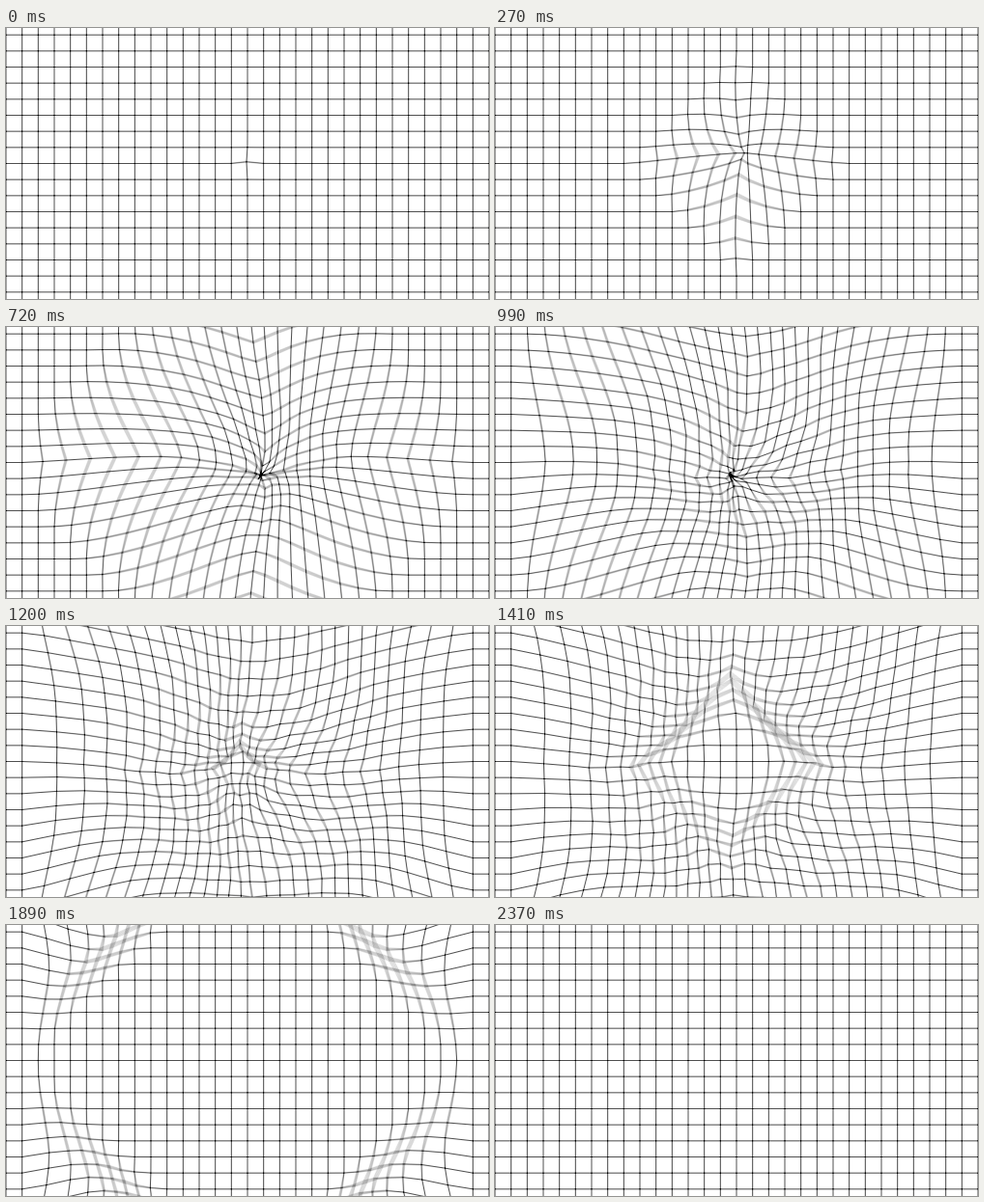
An HTML page with a canvas that plays this animation: 500 px wide and 281 px high, repeating every 2700 ms.

```html
<!DOCTYPE html>
<html lang="en">
<head>
<meta charset="utf-8">
<title>Grid ripple</title>
<style>
  html, body { margin: 0; width: 100%; height: 100%; overflow: hidden; background: #fff; }
  canvas { display: block; width: 100vw; height: 100vh; }
</style>
</head>
<body>
<canvas id="stage" width="500" height="281"></canvas>
<script>
const W = 500, H = 281, CX = 250, CY = 140.5;
const CELL = 500 / 30, COLS = 15, ROWS = 14;
const EDGE = 14 * CELL;           // points from here outwards stay still
const LOOP = 2700, STEP = 30;
const SPEED = 0.36;               // wave speed in px per ms
const LEAD = 30, SPAN = 1330;     // head start and length of one point's trip
const RISE = 450, FALL = 350;     // pull in, hold, let go
const PULL = 38, CORE = 36, SWAY = 20, SHIVER = 4;
const SAMPLES = 8, SHUTTER = 30;  // motion blur

const ctx = document.getElementById('stage').getContext('2d');
const clamp = v => Math.min(1, Math.max(0, v));
const ease = v => (1 - Math.cos(Math.PI * clamp(v))) / 2;

// A diamond-shaped wave pulls each point inwards while it sways round, then frees it.
function place(i, j, t) {
  const x = i * CELL, y = j * CELL;
  const age = t + LEAD - (Math.abs(x) + Math.abs(y)) / SPEED;
  if (Math.abs(i) >= 14 || age <= 0 || age >= SPAN) return [CX + x, CY + y];
  const p = age / SPAN;
  const reach = clamp(Math.pow(x ** 4 + y ** 4, 0.25) / EDGE);
  const pull = PULL * ease(age / RISE) * ease((SPAN - age) / FALL) * (1 - reach ** 8);
  const scale = 1 - pull / Math.hypot(x, y, CORE);
  const wave = Math.sin(Math.PI * p) * (1 - reach * reach);
  const turn = 4 + 5.7 * p;
  const shiver = SHIVER * p * p, beat = age / 24;
  return [
    CX + x * scale + wave * (SWAY * Math.cos(turn) + shiver * Math.cos(beat)),
    CY + y * scale + wave * (SWAY * Math.sin(turn) + shiver * Math.sin(beat))
  ];
}

function strokeGrid(t) {
  const pts = [];
  for (let j = -ROWS; j <= ROWS; j++) {
    const row = [];
    for (let i = -COLS; i <= COLS; i++) row.push(place(i, j, t));
    pts.push(row);
  }
  const trace = line => line.forEach(([x, y], n) => n ? ctx.lineTo(x, y) : ctx.moveTo(x, y));
  ctx.beginPath();
  pts.forEach(trace);
  pts[0].forEach((_, i) => trace(pts.map(row => row[i])));
  ctx.stroke();
}

// Blur samples add up as light on black, then the picture is inverted.
function draw(t) {
  ctx.globalCompositeOperation = 'source-over';
  ctx.fillStyle = '#000';
  ctx.fillRect(0, 0, W, H);
  ctx.globalCompositeOperation = 'lighter';
  const level = Math.floor(240 / SAMPLES);
  ctx.strokeStyle = `rgb(${level},${level},${level})`;
  ctx.lineWidth = 0.75;
  ctx.lineJoin = 'round';
  for (let s = 0; s < SAMPLES; s++) strokeGrid(t + s / SAMPLES * SHUTTER);
  ctx.globalCompositeOperation = 'difference';
  ctx.fillStyle = '#fff';
  ctx.fillRect(0, 0, W, H);
}

const start = performance.now();
let shown = -1;

function tick() {
  const t = (performance.now() - start) % LOOP;
  const now = Math.floor(t / STEP) * STEP;
  if (now !== shown) draw(shown = now);
  requestAnimationFrame(tick);
}
tick();
</script>
</body>
</html>
```
